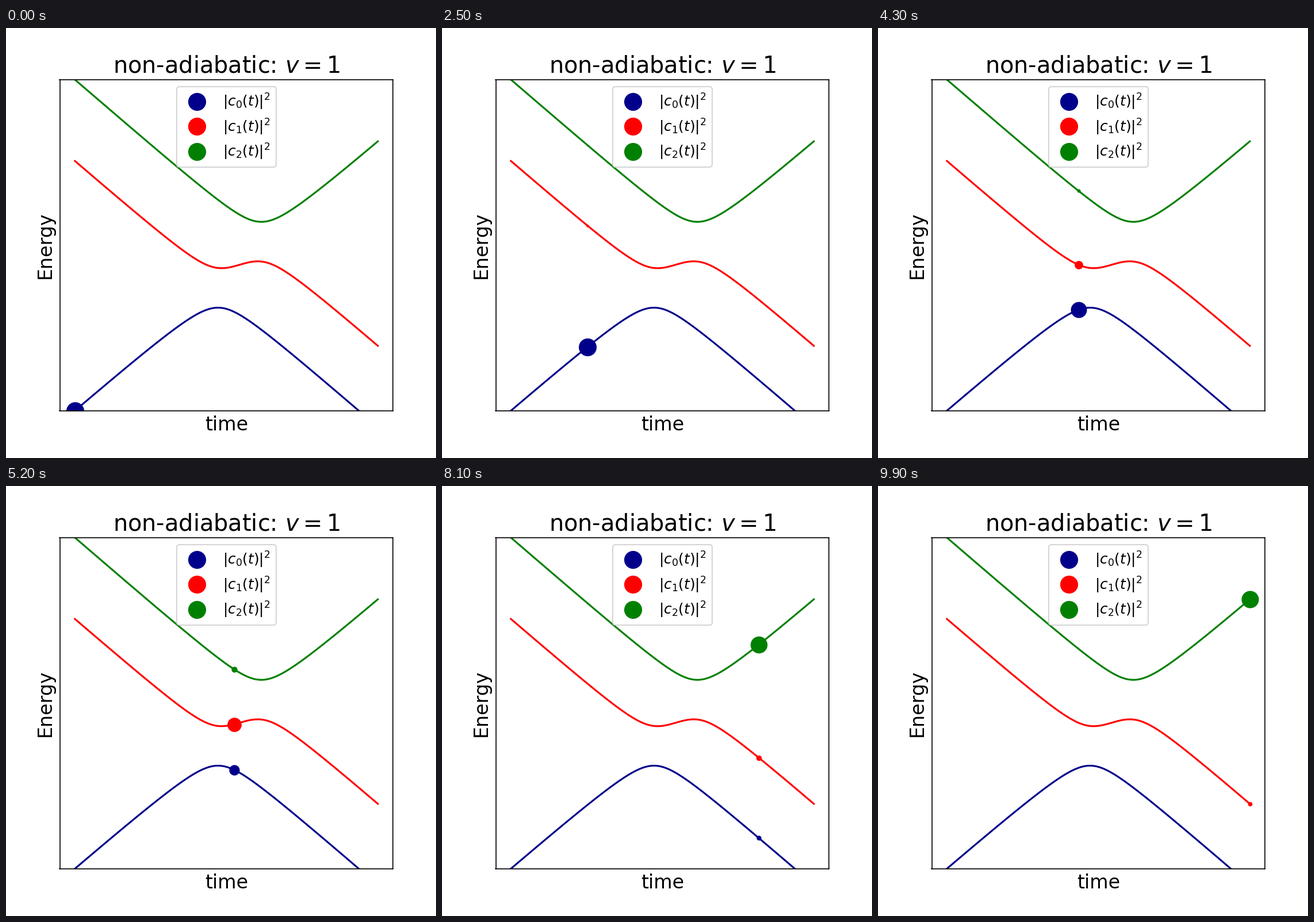
A matplotlib script that plays this animation: 748 by 748 pixels, repeating every 10000 ms.

```python
import numpy as np
import matplotlib.pyplot as plt
from matplotlib.animation import FuncAnimation

FRAMES = 100
SUBSTEPS = 20
FULL = 14                    # marker size at population 1
COLORS = ["darkblue", "red", "green"]

# One rising level coupled to two falling ones
GAP, COUPLING = 1.0, 0.5
START, STEP = -3.5, 0.065
SWEEP = 16                   # sweep rate of the crossing


def eigen(t):
    h = np.array([[t, COUPLING, COUPLING],
                  [COUPLING, GAP - t, 0],
                  [COUPLING, 0, -GAP - t]])
    return np.linalg.eigh(h)


def evolve(psi, t):
    """Carry the state over one frame with short exact steps."""
    dt = STEP / SUBSTEPS
    for j in range(SUBSTEPS):
        e, vec = eigen(t + (j + 0.5) * dt)
        psi = vec @ (np.exp(-1j * e * dt / SWEEP) * (vec.T @ psi))
    return psi


time = START + STEP * np.arange(FRAMES)
energy = np.zeros((FRAMES, 3))
amplitude = np.zeros((FRAMES, 3))
psi = eigen(START)[1][:, 0].astype(complex)
for i, t in enumerate(time):
    energy[i], vec = eigen(t)
    amplitude[i] = np.abs(vec.T @ psi)
    psi = evolve(psi, t)

plt.rcParams.update({"font.family": "DejaVu Sans", "font.size": 16})
fig, ax = plt.subplots(figsize=(5, 5), dpi=149.6)

for k, color in enumerate(COLORS):
    ax.plot(time, energy[:, k], color=color, lw=1.5)
margin = 0.05 * (time[-1] - time[0])
ax.set_xlim(time[0] - margin, time[-1] + margin)
ax.set_ylim(energy[0, 0], energy[0, 2])
ax.set_xticks([])
ax.set_yticks([])
ax.set_xlabel("time")
ax.set_ylabel("Energy")
ax.set_title("non-adiabatic: $v=1$")


def dot(color, **kw):
    return ax.plot([], [], "o", color=color, ms=FULL, **kw)[0]


keys = [dot(c, label=rf"$|c_{k}(t)|^2$") for k, c in enumerate(COLORS)]
ax.legend(handles=keys, loc="upper center", fontsize=12, labelspacing=0.4)
dots = [dot(c) for c in COLORS]


def update(n):
    for k, d in enumerate(dots):
        d.set_data([time[n]], [energy[n, k]])
        d.set_markersize(FULL * amplitude[n, k])
    return dots


anim = FuncAnimation(fig, update, frames=FRAMES, interval=100,
                     repeat=True, repeat_delay=0, blit=False)
plt.show()
```
